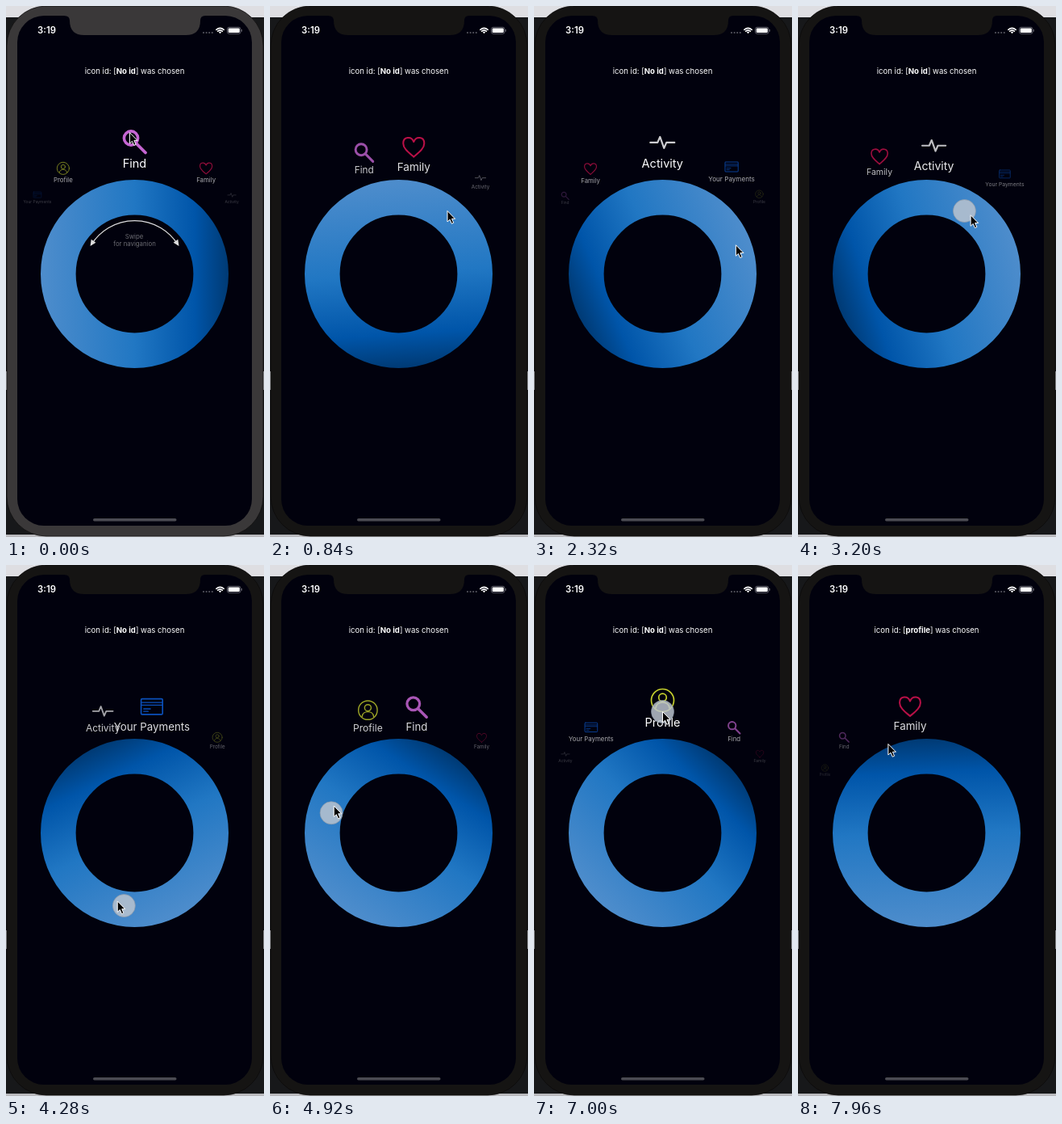
An HTML page that plays this animation: 320x657 px, repeating every 8 s.

```html
<!DOCTYPE html>
<html lang="en">
<head>
<meta charset="utf-8">
<title>Icon wheel</title>
<style>
html, body { margin: 0; width: 100%; height: 100%; overflow: hidden; background: #17181a; }
svg { display: block; width: 100%; height: 100%; }
text { font-family: Inter, Roboto, sans-serif; text-anchor: middle; fill: #fff; }
.line { fill: none; stroke-linecap: round; stroke-linejoin: round; }
</style>
</head>
<body>
<svg viewBox="0 0 320 657" preserveAspectRatio="none">
  <defs>
    <linearGradient id="blue" gradientUnits="userSpaceOnUse" x1="43" y1="331.5" x2="276" y2="331.5">
      <stop offset="0" stop-color="#4e8dcc"/>
      <stop offset=".5" stop-color="#2177c3"/>
      <stop offset=".82" stop-color="#0055a9"/>
      <stop offset="1" stop-color="#003a74"/>
    </linearGradient>
    <g id="find" class="line" stroke="#c565d2">
      <circle cx="-4.5" cy="-4" r="8.6" stroke-width="3.6"/>
      <path d="M2.5 3L13.5 14" stroke-width="3.8"/>
    </g>
    <g id="family" class="line" stroke="#d51350" stroke-width="2.2">
      <path d="M0 13C-7 7-14 2-14-5C-14-14-3-15 0-7C3-15 14-14 14-5C14 2 7 7 0 13Z"/>
    </g>
    <g id="activity" class="line" stroke="#cfcfd2" stroke-width="2.2">
      <path d="M-15 1H-6L-3-6L2 8L5 1H15"/>
    </g>
    <g id="payments" class="line" stroke="#0d5dd6" stroke-width="1.8">
      <rect x="-14.5" y="-10.5" width="29" height="21" rx="1.5"/>
      <path d="M-14-5.5H14M-14-2H14M-11 3H-2M-11 6.5H-5" stroke-width="1.5"/>
    </g>
    <g id="profile" class="line" stroke="#c5cf2d" stroke-width="1.7">
      <circle r="14"/>
      <circle cy="-3.5" r="4.8"/>
      <path d="M-8.5 9.5C-8 0 8 0 8.5 9.5"/>
    </g>
  </defs>

  <path d="M0 0H320V14H0Z" fill="#dedee2"/>
  <path d="M0 452h1v23h-1zM319 452h1v23h-1zM0 654h320v3H0z" fill="#b9b9bd"/>
  <rect id="bezel" x="1" y="0" width="318" height="656" rx="49" stroke="#0b0a09" stroke-width=".7"/>
  <rect x="14" y="12" width="291" height="631" rx="33" fill="#01010d"/>
  <path id="notch" d="M72 11H247V12Q241 12 241 18Q241 36 223 36H97Q79 36 79 18Q79 12 72 12Z"/>

  <text x="50.5" y="34.3" font-size="11.3" font-weight="600">3:19</text>
  <path class="line" d="M245 33H257" stroke="#55555e" stroke-width="2.2" stroke-dasharray="0 3.6"/>
  <path class="line" d="M260.8 29.3Q265.5 25.3 270.2 29.3M262.7 31.2Q265.5 28.9 268.3 31.2" stroke="#fff" stroke-width="1.6"/>
  <path d="M263.8 32.3Q265.5 31 267.2 32.3L265.5 34.2Z" fill="#fff"/>
  <rect x="274.5" y="26.3" width="16.5" height="8" rx="2.3" fill="none" stroke="#777780" stroke-width=".8"/>
  <rect x="275.7" y="27.5" width="14.1" height="5.6" rx="1.3" fill="#fff"/>
  <path d="M292.2 29v2.7" stroke="#777780"/>

  <text x="159.5" y="83.7" font-size="9.6" fill="#eee">icon id: [<tspan id="chosen" font-weight="700">No id</tspan>] was chosen</text>
  <circle cx="159.5" cy="331.5" r="94.7" fill="none" stroke="url(#blue)" stroke-width="43.6"/>
  <g id="hint">
    <path class="line" d="M106 295A63.4 63.4 0 0 1 213 295" stroke="#ddd" stroke-width="1.2"/>
    <path d="M104.5 297l1.2-8.2 5.7 4zM214.5 297l-1.2-8.2-5.7 4z" fill="#ddd"/>
    <g font-size="7.8">
      <text x="159" y="287.5" style="fill:#6b6b72">Swipe</text>
      <text x="159.5" y="297" style="fill:#6b6b72">for naviganion</text>
    </g>
  </g>
  <g id="items"></g>
  <rect x="108" y="634" width="103.5" height="3.6" rx="1.8" fill="#4b4b52"/>
  <circle id="touch" r="14" fill="#bcc5cf" fill-opacity=".84" stroke="#8e9aa8" stroke-width=".7"/>
  <path id="cursor" d="M0 0V13.5L3.1 10.7L5.3 15.8L7.7 14.8L5.5 9.8H9.6Z" fill="#000" stroke="#fff"/>
</svg>
<script>
const LOOP = 8000, CX = 159.5, CY = 331.5, DEG = Math.PI / 180;
const TAP = 7050, FLICK = 7480;
const $ = id => document.getElementById(id);
const mix = (a, b, s) => a + (b - a) * s;
const smooth = s => s * s * (3 - 2 * s);
const easeOut = s => 1 - (1 - s) ** 3;

// Pointer strokes: time span, angle span, wheel span in icon steps, radius
const strokes = [
  [0, 0, 268, 268, 0, 0, 175],
  [320, 700, 225, 325, 0, -3, 98],
  [1140, 1800, 254, 359, -5, -7.9, 101],
  [3140, 4280, 298, 464, -8, -12.4, 91],
  [4280, 5300, 464, 621, -12.4, -17.2, 87],
  [5780, 6350, 664, 599, -18, -16.3, 90],
  [6950, TAP, 630, 630, -16, -16, 150],
  [FLICK, 7800, 650, 612, -16, -14.4, 110],
  [LOOP, LOOP, 606, 606, -13.6, -13.6, 121],
].map(([t0, t1, a0, a1, w0, w1, r]) => ({ t0, t1, a0, a1, w0, w1, r }));

// Steady during a stroke; between strokes the wheel settles and the pointer travels
function pose(t) {
  t = Math.max(0, t);
  const i = strokes.findLastIndex(k => t >= k.t0), k = strokes[i];
  if (t < k.t1) {
    const s = (t - k.t0) / (k.t1 - k.t0);
    return { down: true, angle: mix(k.a0, k.a1, s), wheel: mix(k.w0, k.w1, s), r: k.r };
  }
  const next = strokes[i + 1], s = (t - k.t1) / (next.t0 - k.t1);
  return {
    down: false,
    angle: mix(k.a1, next.a0, smooth(s)),
    wheel: mix(k.w1, next.w0, easeOut(s)),
    r: mix(k.r, next.r, smooth(s)),
  };
}

// Look of an icon by its distance d from the top slot
const spread = d => d < 1 ? 35.4 * d ** 1.6 : 35.4 + 16.6 * (d - 1);
const scale = d => d < 1 ? 1 - .46 * d ** 1.9 : .54 / d ** .67;
const fade = d => d < 1 ? 1 - .34 * d : .66 / d ** 1.5;
const ring = d => 153 - 5.5 * Math.max(0, Math.sin(Math.PI * d));

const items = ['Find', 'Family', 'Activity', 'Your Payments', 'Profile'].map((label, slot) => {
  const id = label.split(' ').pop().toLowerCase();
  const el = document.createElementNS('http://www.w3.org/2000/svg', 'g');
  el.innerHTML = `<use href="#${id}" y="-11"/><text y="21" font-size="14.5">${label}</text>`;
  $('items').append(el);
  return { el, slot };
});

function place(el, angle, r, rest = '') {
  const x = CX + r * Math.cos(angle * DEG), y = CY + r * Math.sin(angle * DEG);
  el.setAttribute('transform', `translate(${x.toFixed(2)} ${y.toFixed(2)}) ${rest}`);
}

function render(t) {
  const now = pose(t), lag = pose(t - 40);
  // Icons that come in while the wheel turns show up late
  const low = now.wheel - lag.wheel < -.02 ? -1.55 : -2.4;
  const high = t > FLICK ? Math.min(2.1, -13.5 - now.wheel) : 2.1;

  for (const { el, slot } of items) {
    const turn = slot - now.wheel + 2.5;
    const u = turn - 5 * Math.floor(turn / 5) - 2.5, d = Math.abs(u);
    el.setAttribute('opacity', u > low && u < high ? fade(d).toFixed(3) : 0);
    place(el, Math.sign(u) * spread(d) - 90, ring(d), `scale(${scale(d).toFixed(3)})`);
  }

  $('blue').setAttribute('gradientTransform', `rotate(${(-now.wheel * 19.7).toFixed(2)} ${CX} ${CY})`);
  const frame = t < 320 ? '#3a3839' : '#151413';
  $('bezel').setAttribute('fill', frame);
  $('notch').setAttribute('fill', frame);
  $('hint').setAttribute('opacity', Math.max(0, Math.min(1, (520 - t) / 200)));
  $('chosen').textContent = t < TAP ? 'No id' : 'profile';

  $('touch').setAttribute('visibility', now.down ? 'visible' : 'hidden');
  place($('touch'), lag.angle, lag.r);
  place($('cursor'), now.angle, now.r);
}

const start = performance.now();
function tick() {
  render((performance.now() - start) % LOOP);
  requestAnimationFrame(tick);
}
tick();
</script>
</body>
</html>
```
